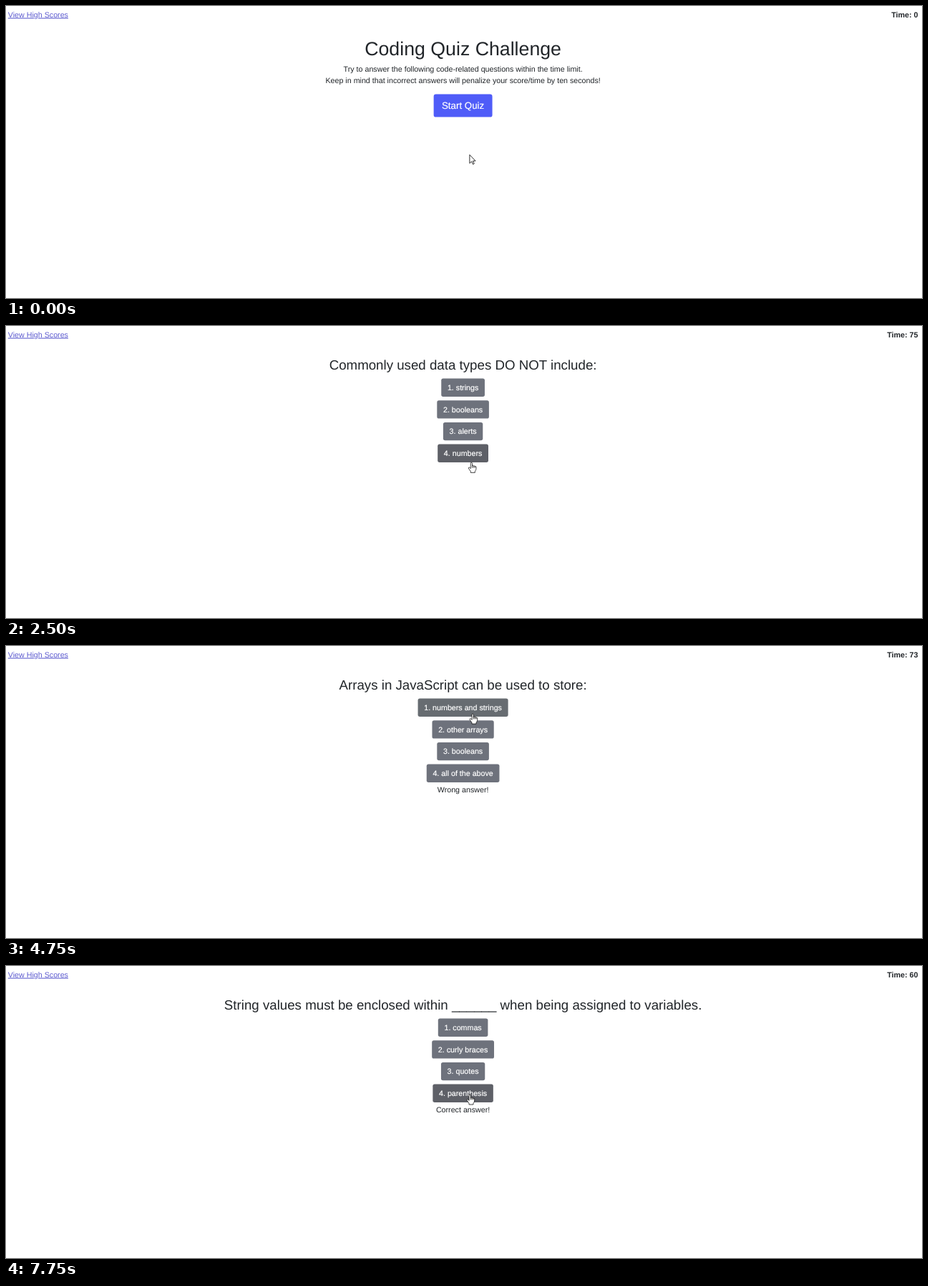
Recreate the animation shown at these times as an HTML page. Size 1280x409 px, loop 8 s.

```html
<!DOCTYPE html>
<html lang="en">
<head>
<meta charset="utf-8">
<title>Coding Quiz</title>
<style>
  html, body { margin: 0; width: 100%; height: 100%; overflow: hidden; background: #fff; }
  svg { display: block; width: 1280px; height: 409px; }
  text { font: 10.69px "Liberation Sans", Arial, sans-serif; fill: #212529; text-rendering: geometricPrecision; }
  .mid { text-anchor: middle; }
  .h1 { font-size: 26.72px; }
  .h3 { font-size: 18.72px; }
  .label { fill: #fff; stroke: #fff; stroke-width: .2; }
  .large { font-size: 13.333px; }
  .link { fill: #5f5dd0; text-decoration: underline .7px; }
  .time { font-weight: bold; text-anchor: end; }
  .cursor path { fill: #fff; stroke: #000; stroke-width: 1.1; stroke-linejoin: round; }
</style>
</head>
<body>
<svg viewBox="0 0 1280 409">
  <text class="link" x="2.8" y="15.6">View High Scores</text>
  <text class="time" id="time" x="1274.4" y="15.6"></text>
  <g id="scenes"></g>
  <text class="mid" id="message" x="638.6" y="205.2"></text>
  <g class="cursor" id="arrow"><path transform="scale(.75)" d="M.5 .5V16.5L4.2 13 6.6 18.3 9 17.2 6.6 12H11.5Z"/></g>
  <g class="cursor" id="hand"><path transform="scale(.67) translate(-6.5 -.5)" d="M6.5 .5C5.5 .5 5 1.2 5 2V13L3 10.8C2 10 .5 10.7 .5 11.8c0 1 1 2 1.6 3L5 19V21.5H14V19C15.5 17 16.5 15 16.5 12.5V9.5c0-1.6-2.6-1.6-2.6 0V8.5c0-1.6-2.8-1.6-2.8 0V7.7c0-1.6-2.8-1.6-2.8 0V2C8.3 1.2 7.6 .5 6.5 .5ZM8.3 7.7v3.8M11.1 8.5v3M13.9 9.5v2"/></g>
</svg>
<script>
const CENTER = 638.6, STEP = 250, LOOP = 8000;
const SECOND = 1000, TIME_LIMIT = 75, PENALTY = 10;
const GREY = { rest: '#6e727c', easing: '#676c71', hover: '#5e6067' };
const BLUE = { rest: '#4f5cf8', easing: '#474fe0', hover: '#3f48d0' };
const CORRECT = 'Correct answer!', WRONG = 'Wrong answer!';

// Each question appears with the verdict on the answer before it.
const questions = [
  { from: 1250, verdict: '', title: 'Commonly used data types DO NOT include:',
    answers: ['strings', 'booleans', 'alerts', 'numbers'] },
  { from: 3500, verdict: CORRECT, title: 'The condition in an if/else statement is contained in:',
    answers: ['quotes', 'curly braces', 'parenthesis', 'square brackets'] },
  { from: 4750, verdict: WRONG, title: 'Arrays in JavaScript can be used to store:',
    answers: ['numbers and strings', 'other arrays', 'booleans', 'all of the above'] },
  { from: 7250, verdict: CORRECT, title: 'String values must be enclosed within ______ when being assigned to variables.',
    answers: ['commas', 'curly braces', 'quotes', 'parenthesis'] }
];

// Places the pointer rests at or turns around
const stops = [
  { arrive: 0, leave: 500, x: 647.5, y: 208 },
  { arrive: 1000, leave: 1500, x: 647, y: 148.5 },
  { arrive: 1750, leave: 1750, x: 648, y: 128 },
  { arrive: 2500, leave: 2500, x: 650.3, y: 191.3 },
  { arrive: 3000, leave: 3500, x: 648, y: 148.5 },
  { arrive: 4000, leave: 4000, x: 649, y: 106 },
  { arrive: 4500, leave: 5000, x: 652, y: 95 },
  { arrive: 6000, leave: 6000, x: 656.3, y: 154 },
  { arrive: 6750, leave: LOOP, x: 648, y: 180 }
];

const byId = id => document.getElementById(id);
const mix = (a, b, k) => a + (b - a) * k;
const smooth = k => k * k * (3 - 2 * k);

function add(parent, tag, attrs, content = '') {
  const node = document.createElementNS('http://www.w3.org/2000/svg', tag);
  for (const name in attrs) node.setAttribute(name, attrs[name]);
  node.textContent = content;
  return parent.appendChild(node);
}

function addLine(parent, style, y, content) {
  return add(parent, 'text', { class: 'mid ' + style, x: CENTER, y }, content);
}

function addButton(parent, label, y, large, colors) {
  const height = large ? 32 : 25.333, size = large ? 13.333 : 10.667;
  const box = add(parent, 'rect', { y, height, rx: large ? 3.2 : 2.667 });
  const text = addLine(parent, large ? 'label large' : 'label', y + height / 2 + size * .3465, label);
  const width = text.getComputedTextLength() + (large ? 22.667 : 17.333);
  box.setAttribute('x', CENTER - width / 2);
  box.setAttribute('width', width);
  return { box, colors, top: y, bottom: y + height };
}

function buildIntro() {
  const group = add(byId('scenes'), 'g', {});
  addLine(group, 'h1', 68.6, 'Coding Quiz Challenge');
  addLine(group, '', 92.3, 'Try to answer the following code-related questions within the time limit.');
  addLine(group, '', 108.3, 'Keep in mind that incorrect answers will penalize your score/time by ten seconds!');
  return { group, from: 0, verdict: '', buttons: [addButton(group, 'Start Quiz', 123.6, true, BLUE)] };
}

function buildQuestion({ from, verdict, title, answers }) {
  const group = add(byId('scenes'), 'g', {});
  addLine(group, 'h3', 61, title);
  const buttons = answers.map((answer, i) =>
    addButton(group, `${i + 1}. ${answer}`, 73.6 + i * 30.667, false, GREY));
  return { group, from, verdict, buttons };
}

const scenes = [buildIntro(), ...questions.map(buildQuestion)];

function pointerAt(now) {
  const next = stops.findIndex(stop => stop.leave >= now);
  const to = stops[next], from = stops[next - 1];
  if (now >= to.arrive) return to;
  const k = smooth((now - from.leave) / (to.arrive - from.leave));
  return { x: mix(from.x, to.x, k), y: mix(from.y, to.y, k) };
}

// Wrong answers cost time from the next tick on.
function timeLeft(now) {
  const firstTick = questions[0].from + SECOND;
  if (now < firstTick) return 0;
  const ticks = Math.floor((now - firstTick) / SECOND);
  const lastTick = firstTick + ticks * SECOND;
  const mistakes = questions.filter(q => q.verdict === WRONG && q.from < lastTick).length;
  return TIME_LIMIT - ticks - mistakes * PENALTY;
}

function draw(now) {
  const scene = scenes.findLast(({ from }) => from <= now);
  const { x, y } = pointerAt(now);
  const tip = y - 2;
  const hovered = scene.buttons.find(({ top, bottom }) => tip >= top && tip < bottom);
  for (const { group } of scenes) group.style.display = group === scene.group ? '' : 'none';
  for (const button of scene.buttons) {
    const state = button !== hovered ? 'rest' : now === scene.from ? 'easing' : 'hover';
    button.box.setAttribute('fill', button.colors[state]);
  }
  byId('time').textContent = 'Time: ' + timeLeft(now);
  byId('message').textContent = now < scene.from + SECOND ? scene.verdict : '';
  byId('arrow').style.display = hovered ? 'none' : '';
  byId('hand').style.display = hovered ? '' : 'none';
  for (const id of ['arrow', 'hand']) byId(id).setAttribute('transform', `translate(${x} ${y})`);
}

const start = performance.now();
let shown = -1;
function tick() {
  const now = Math.floor((performance.now() - start) % LOOP / STEP) * STEP;
  if (now !== shown) draw(shown = now);
  requestAnimationFrame(tick);
}
tick();
</script>
</body>
</html>
```
